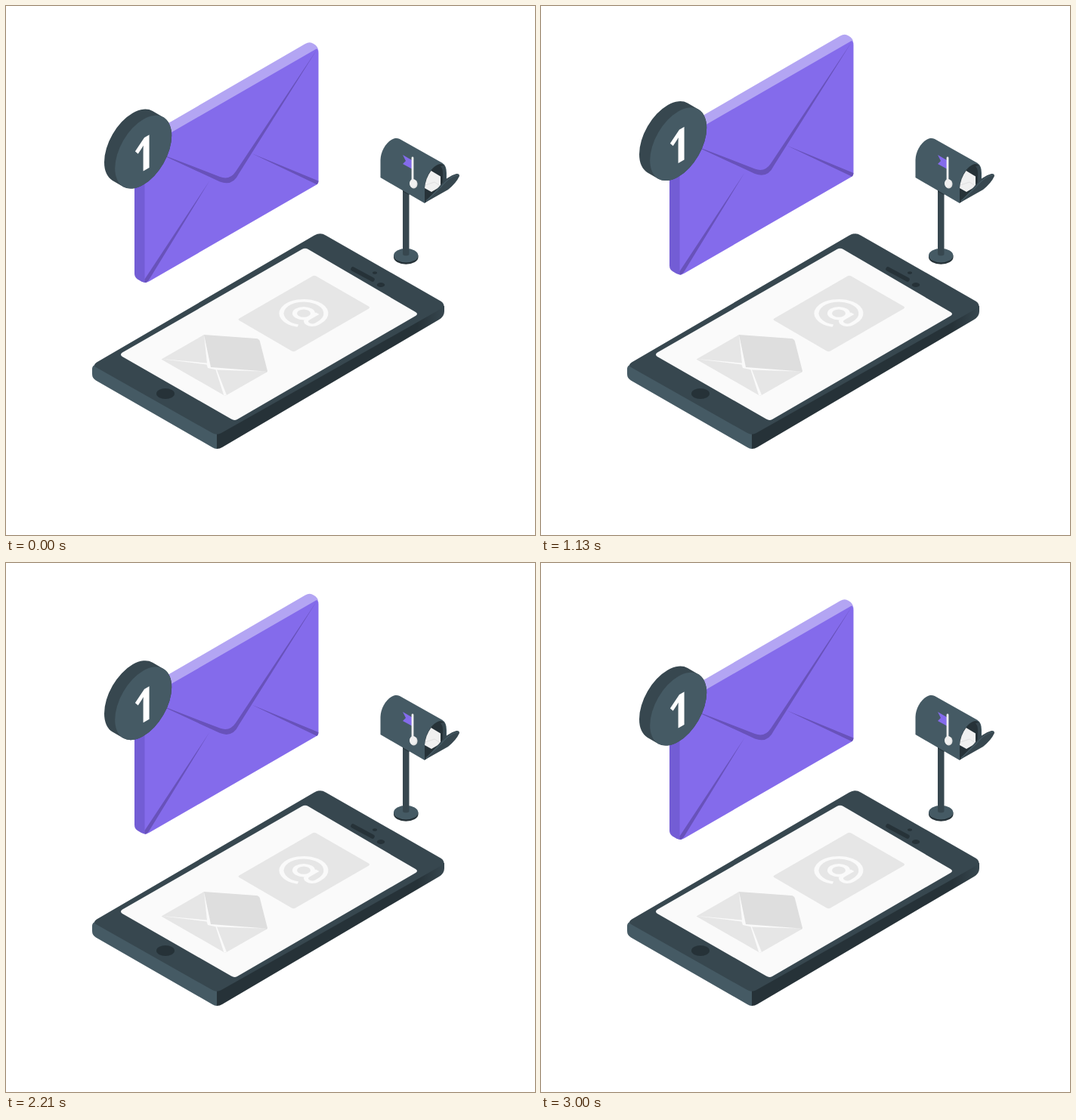
Recreate the animation shown at these times as an HTML page. Size 700 px wide and 700 px high, loop 3.04 s.

```html
<!DOCTYPE html>
<html lang="en">
<head>
<meta charset="utf-8">
<title>New mail</title>
<style>
  html, body { margin: 0; width: 100%; height: 100%; overflow: hidden; background: #fff; }
  svg { display: block; width: 100vw; height: 100vh; }
  .slate { fill: #455a64; }
  .dark { fill: #37474f; }
  .ink { fill: #263238; }
  .fold { fill: #6852ba; }
  .paper { fill: #fafafa; }
  .card { fill: #e6e6e6; }
</style>
</head>
<body>
<svg viewBox="0 0 700 700">
  <defs>
    <linearGradient id="edge" gradientUnits="userSpaceOnUse" x1="279" y1="0" x2="580" y2="0">
      <stop offset="0" stop-color="#263238"/>
      <stop offset=".88" stop-color="#263238"/>
      <stop offset="1" stop-color="#37474f"/>
    </linearGradient>
  </defs>

  <g id="phone">
    <path class="slate" d="M114 480 Q114 476 119 474 L279 566 V586 Q276 586 273 584 L119 495.500 Q114 492.500 114 487 Z"/>
    <path fill="url(#edge)" d="M279 566 L573 394 L580 397 V404 Q580 411 573 415 L286 584 Q283 586 279 586 Z"/>
    <path class="dark" d="M119 478 Q114.500 475 120 471.500 L408 303.500 Q416 299 423 303.500 L576 391 Q583 396 576 400.500 L285 565 Q279 568.500 273 565 Z"/>
    <path class="paper" d="M391.500 322 Q396 319.500 400 322 L542 405 Q546 407.500 542 410 L306 547 Q302 549 298 546.500 L154 464 Q150 461 154 458.500 Z"/>
    <ellipse class="ink" cx="211" cy="513" rx="12" ry="7"/>
    <path d="M459 348 L485 362" stroke="#263238" stroke-width="5.500" stroke-linecap="round"/>
    <ellipse class="ink" cx="488" cy="353" rx="3" ry="1.800"/>
    <ellipse class="ink" cx="496" cy="369" rx="5.200" ry="3"/>

    <path class="card" d="M405.500 357.500 Q408 356 410.500 357.500 L480 397.500 Q482 399 480 400.500 L383 456.500 Q380.500 458 378 456.500 L308.500 416 Q306.500 414.500 308.500 413.500 Z"/>
    <g transform="matrix(.866 .5 -.866 .5 394 406.700)" fill="none" stroke="#fafafa" stroke-width="5">
      <path d="M12 20.800 A24 24 0 1 1 24 0 V4 C24 13 10.500 13 10.500 4 V-10.500"/>
      <circle r="9.800"/>
    </g>

    <path class="card" d="M205.500 467.500 L262 435 L346 484 L290 516 Z"/>
    <path fill="#dedede" d="M262 435 L331 440 Q335 440.300 336 444 L346 483 L345 484.500 L270 478 Z"/>
    <path class="paper" d="M205.500 467 L266 472.500 L262 435 L271 478 L346 483.800 L279 481.500 L292 515 L288.500 516 L277.500 481.300 L267 479 L265.500 474.500 Z"/>
  </g>

  <g id="mailbox">
    <path class="ink" d="M513 330 V332.500 A16 9 0 0 0 545.500 332.500 V330 Z"/>
    <ellipse class="slate" cx="529.200" cy="330" rx="16.200" ry="9.300"/>
    <path class="dark" d="M525 242 H533.500 V328 A4.250 2.500 0 0 1 525 328 Z"/>
    <path class="ink" d="M525 242 H533.500 V250 L525 245.500 Z"/>
    <path class="slate" d="M495.500 227 V204 C495.500 191 505 177 515 175 Q518 174.500 521 176 L577 207.500 Q583 211 583 221 V238 L554 261 Z"/>
    <path class="ink" d="M554 260 V241 C554 226 565 210 575 209 C580 209 581.500 213 581.500 220 V244 Z"/>
    <path class="dark" d="M579 211 Q581.500 213 581.500 220 V236 L578 237 V221 Q578 215 575 212 Z"/>
    <path fill="#f0f0f0" d="M554 241 Q555 228 562.500 218 L575 225.500 V239 L563 246 Z"/>
    <path d="M555 237 L567 233 L575 238" fill="none" stroke="#e0e0e0"/>
    <path class="dark" d="M554 260.500 L574 238 Q584 225 596 222 Q600 221.500 600 225 Q596 234 585 243 Z"/>
    <path d="M556 258 L576 239 Q586 226 599 223" fill="none" stroke="#455a64" stroke-width="1.200"/>
    <path fill="#846beb" d="M525 197 L537 204 V215.500 L525 209 L529 205 Z"/>
    <ellipse fill="#e0e0e0" cx="539.500" cy="235.500" rx="5" ry="6"/>
    <ellipse fill="#f0f0f0" cx="538.600" cy="234.600" rx="4.600" ry="5.500"/>
    <path d="M538 201 V235" stroke="#f0f0f0" stroke-width="2.800" stroke-linecap="round"/>
  </g>

  <g id="mail">
    <path fill="#b3a5f3" d="M172 182 Q173 179 177 177 L396 50 Q402 46.500 407 50 Q413 53 413.500 60 L186 192 Z"/>
    <path fill="#735dd5" d="M170 184 V354 Q170 359 174 361.500 L179 364.500 Q182 366 186 366 V190 Z"/>
    <path fill="#846beb" d="M183.500 193 Q183.500 188 188 185 L411 56.500 Q413.500 58 413.500 62 V231 Q413.500 235 410 237 L190 364 Q186 366.500 183.500 366 Z"/>
    <path class="fold" d="M269.500 231 L190 361 Q187 366 183.500 366 V361.500 Z"/>
    <path class="fold" d="M325 195 L413.500 231.500 Q413.500 235 411.500 236.300 Z"/>
    <path class="fold" d="M200 194 L283 226 Q296 231 304 219 L411.500 57.500 L308 222 Q300 239 283 232.500 Z"/>
    <g transform="matrix(.866 -.5 0 1 181.700 193.200)" stroke-linecap="round">
      <path d="M0 0 L-16.400 -16.400" stroke="#37474f" stroke-width="86.600"/>
      <circle class="slate" r="43.300"/>
    </g>
    <text transform="matrix(.866 -.5 0 1 189.500 214)" x="-25.200" y="0" fill="#fff" font-family="'Open Sans', 'Noto Sans', sans-serif" font-size="61" font-weight="700">1</text>
  </g>
</svg>
<script>
  const LOOP = 3040, SWING = 3000, RISE = 14, STEP = 1000 / 24;
  const mail = document.getElementById('mail');
  const start = performance.now();

  // Rises and sinks at constant speed, at 24 steps a second.
  function draw(now) {
    const t = Math.max(0, now - start) % LOOP;
    const stepped = Math.floor((t + 4) / STEP) * STEP;
    const phase = Math.min(1, stepped / SWING);
    const lift = RISE * (1 - Math.abs(1 - 2 * phase));
    mail.setAttribute('transform', `translate(0 ${-lift})`);
    requestAnimationFrame(draw);
  }
  draw(start);
</script>
</body>
</html>
```
